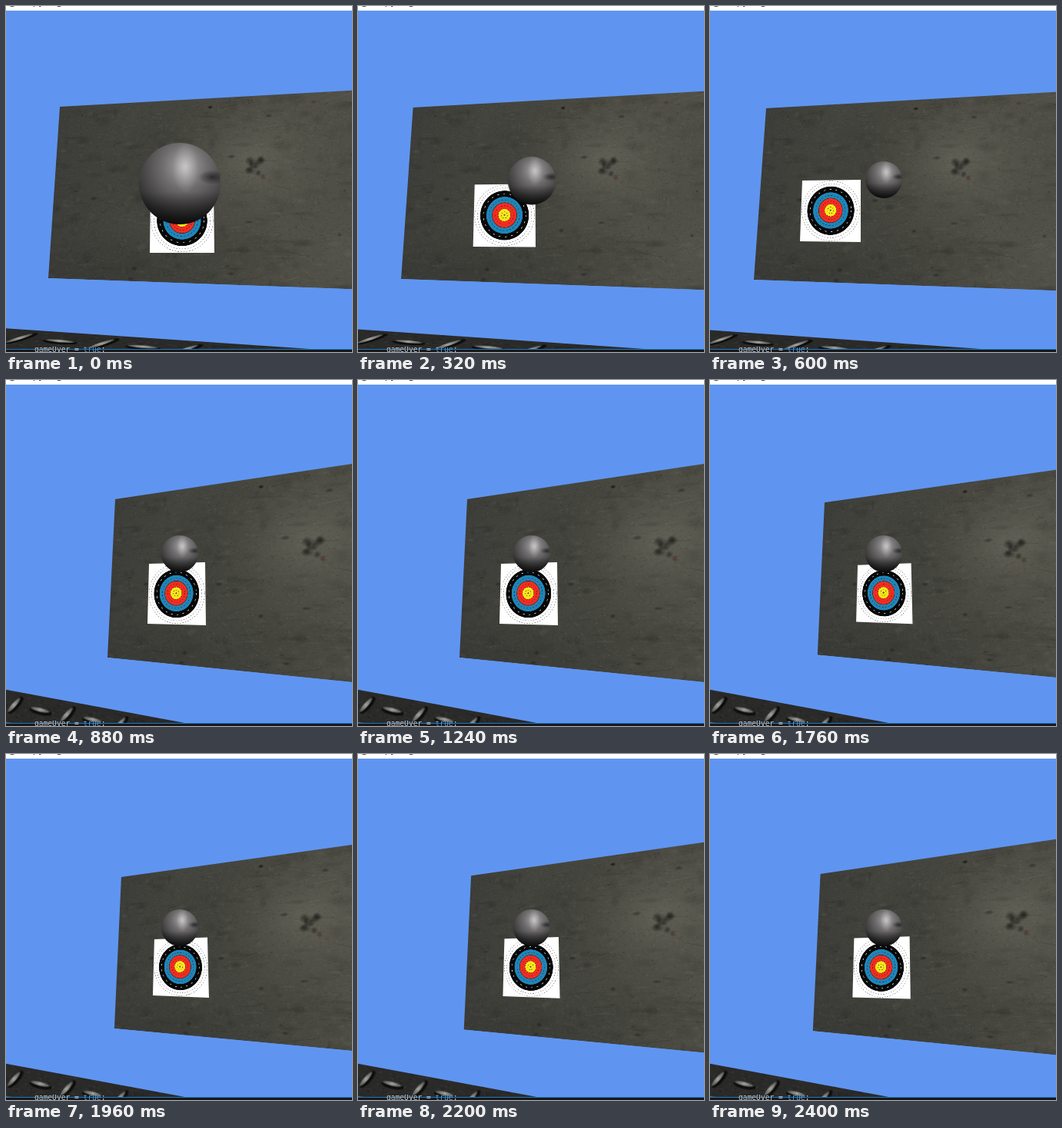
These frames come from a looping animation (450 by 450 pixels, 2.44 s). An HTML page with a canvas:

```html
<!DOCTYPE html>
<html lang="en">
<head>
<meta charset="utf-8">
<title>Ball and target</title>
<style>
  html, body { margin: 0; width: 100%; height: 100%; overflow: hidden; background: #5f95f0; }
  #stage { position: relative; width: 450px; height: 450px; overflow: hidden; background: #5f95f0; }
  #stage > * { position: absolute; left: 0; top: 0; }
  .plane { transform-origin: 0 0; }
  #ball {
    width: 106px; height: 106px; border-radius: 50%;
    background:
      radial-gradient(ellipse 18% 9% at 90% 42%, #0008 0, #0000 100%),
      radial-gradient(ellipse 16% 32% at 57% 30%, #fff5 0, #fff0 100%),
      linear-gradient(#0000 60%, #000a 100%),
      radial-gradient(circle at 56% 29%, #acaaaa 0, #8e8c8c 14%, #6f6d6d 30%, #575556 46%, #3f3e3f 62%, #161616 86%);
  }
  #title {
    width: 450px; height: 6px; overflow: hidden; background: #fff;
    font: 12px "Open Sans", sans-serif; color: #222;
  }
  #title span { position: absolute; top: -14px; line-height: 16px; }
  #editor {
    top: 446px !important; width: 450px; height: 4px; overflow: hidden;
    background: #17181c; border-top: 1px solid #2377b8; box-sizing: border-box;
  }
  #code {
    left: 37px !important; top: 443px !important; height: 7px; overflow: hidden; white-space: pre;
    font: 9.6px/8px "DejaVu Sans Mono", monospace; color: #c4c7ca;
  }
  #code b { font-weight: 400; color: #569cd6; }
</style>
</head>
<body>
<div id="stage">
  <canvas id="floor" class="plane" width="280" height="70"></canvas>
  <canvas id="wall" class="plane" width="600" height="300"></canvas>
  <svg id="target" class="plane" width="200" height="200" viewBox="-100 -100 200 200">
    <path fill="#fff" d="M-100-100H100V100H-100z"/>
    <g fill="none" stroke="#777" stroke-width="1.5" stroke-dasharray="4 5">
      <circle r="97"/><circle r="88"/>
    </g>
    <circle r="79" fill="#080808"/>
    <circle r="69" fill="none" stroke="#ccc" stroke-width="2" stroke-dasharray="6 14"/>
    <circle r="59" fill="#2085b8"/>
    <circle r="40" fill="#f52c20"/>
    <circle r="20" fill="#f8e71c"/>
    <g fill="none" stroke="#222" stroke-width="1.3">
      <circle r="49" stroke-dasharray="5 6"/><circle r="40"/>
      <circle r="30" stroke-dasharray="4 6"/><circle r="20" stroke-dasharray="4 4"/>
      <circle r="10" stroke-dasharray="4 5"/>
      <path d="M-3 0H3M0-3V3"/>
    </g>
  </svg>
  <div id="ball"></div>
  <div id="title">
    <span style="left:5px">g</span><span style="left:35px">p</span>
    <span style="left:43px">y</span><span style="left:66px">g</span>
  </div>
  <div id="editor"></div>
  <div id="code">gameOver = <b>true</b>;</div>
</div>
<script>
const LOOP = 2440, STEP = 40;
const TURN_START = 640, TURN_END = 880, SWAY_START = 1240, SWAY_HALF = 680;
const $ = id => document.getElementById(id);
const floor = $('floor'), wall = $('wall'), target = $('target'), ball = $('ball');

// Corners run clockwise from the top left: x, y pairs.
const poses = {
  start: {
    wall: [70, 131, 517, 106, 526, 371, 55, 354],
    target: [188, 238, 270, 238, 271, 321, 187, 321],
    floor: [-20, 418, 440, 449, 400, 495, -80, 460]
  },
  left: {
    wall: [73, 133, 518, 108, 527, 373, 57, 356],
    target: [120, 227, 196, 226, 196, 307, 117, 306],
    floor: [-20, 420, 410, 450, 370, 497, -75, 462]
  },
  near: {
    wall: [142, 155, 668, 76.5, 685, 416.6, 132, 361],
    target: [186, 239, 259, 237, 260, 319, 184, 317],
    floor: [-20, 399, 270, 453, 255, 520, -35, 466]
  },
  far: {
    wall: [150, 160, 643, 91, 660, 405.7, 141, 357],
    target: [193, 241, 262, 238.5, 264, 317, 191, 314],
    floor: [-20, 399, 270, 453, 255, 520, -35, 466]
  }
};

function random(seed) {
  return () => (seed = (seed * 16807) % 2147483647) / 2147483647;
}

function blot(c, x, y, rx, ry, color) {
  c.save();
  c.translate(x, y);
  c.scale(rx, ry);
  const g = c.createRadialGradient(0, 0, 0, 0, 0, 1);
  g.addColorStop(0, color);
  g.addColorStop(1, 'transparent');
  c.fillStyle = g;
  c.fillRect(-1, -1, 2, 2);
  c.restore();
}

function paintWall() {
  const c = wall.getContext('2d'), { width: w, height: h } = wall, r = random(71);
  const shade = c.createLinearGradient(0, 0, w, 0);
  shade.addColorStop(0, '#3d3d39');
  shade.addColorStop(.3, '#464640');
  shade.addColorStop(.7, '#56564d');
  shade.addColorStop(1, '#54544b');
  c.fillStyle = shade;
  c.fillRect(0, 0, w, h);
  blot(c, w * .6, h * .35, w * .4, h * .6, 'rgba(118,118,104,.42)');
  blot(c, w * .4, h, w * .6, h * .3, 'rgba(25,25,25,.22)');
  for (let i = 0; i < 480; i++) {
    const tone = r() < .5 ? '15,15,14' : '135,135,120';
    blot(c, r() * w, r() * h, 4 + r() * 26, 2 + r() * 11, `rgba(${tone},${.04 + r() * .12})`);
  }
  for (let i = 0; i < 7000; i++) {
    c.fillStyle = r() < .5 ? 'rgba(0,0,0,.15)' : 'rgba(170,170,152,.12)';
    c.fillRect(r() * w, r() * h, 1 + r() * 2, 1);
  }
  c.lineWidth = .7;
  for (let i = 0; i < 45; i++) {
    const x = r() * w, y = r() * h;
    c.strokeStyle = r() < .5 ? 'rgba(0,0,0,.2)' : 'rgba(160,160,145,.15)';
    c.beginPath();
    c.moveTo(x, y);
    c.lineTo(x + 15 + r() * 45, y + (r() - .6) * 35);
    c.stroke();
  }
  for (let i = 0; i < 22; i++) {
    blot(c, r() * w, r() * h, 2 + r() * 6, 1 + r() * 3, 'rgba(12,12,10,.4)');
  }
  for (let i = 0; i < 9; i++) {
    blot(c, w * .61 + (r() - .5) * 24, h * .385 + (r() - .5) * 24, 4 + r() * 7, 3 + r() * 6, 'rgba(16,15,13,.5)');
  }
  blot(c, w * .633, h * .44, 4, 5, 'rgba(125,52,38,.7)');
  blot(c, w * .48, h * .05, 5, 3, 'rgba(8,8,8,.85)');
  blot(c, w * .77, h * .05, 5, 3, 'rgba(115,50,38,.6)');
}

function paintFloor() {
  const c = floor.getContext('2d'), r = random(9);
  c.fillStyle = '#2a2a29';
  c.fillRect(0, 0, 280, 70);
  for (let i = 0; i < 900; i++) {
    c.fillStyle = r() < .5 ? '#0003' : '#8882';
    c.fillRect(r() * 280, r() * 70, 3, 1);
  }
  for (let row = 0; row < 3; row++) {
    for (let col = 0; col < 9; col++) {
      c.save();
      c.translate(33 + col * 33, 18 + row * 27);
      c.rotate((row + col) % 2 ? .05 : -1.1);
      c.fillStyle = '#0d0d0d';
      c.beginPath();
      c.ellipse(1, 2, 14, 4.5, 0, 0, 7);
      c.fill();
      const g = c.createLinearGradient(-13, 0, 13, 0);
      g.addColorStop(0, '#4b4b48');
      g.addColorStop(.5, '#a0a09a');
      g.addColorStop(1, '#4b4b48');
      c.fillStyle = g;
      c.beginPath();
      c.ellipse(0, 0, 12, 2.5, 0, 0, 7);
      c.fill();
      c.restore();
    }
  }
}

const mix = (a, b, k) => a + (b - a) * k;
const mixQuad = (a, b, k) => a.map((v, i) => mix(v, b[i], k));
const clamp = v => Math.min(1, Math.max(0, v));

// Projective map from a w by h rectangle to four corners.
function project(el, w, h, [x0, y0, x1, y1, x2, y2, x3, y3]) {
  const dx1 = x1 - x2, dx2 = x3 - x2, sx = x0 - x1 + x2 - x3;
  const dy1 = y1 - y2, dy2 = y3 - y2, sy = y0 - y1 + y2 - y3;
  const det = dx1 * dy2 - dx2 * dy1;
  const g = (sx * dy2 - dx2 * sy) / det, k = (dx1 * sy - sx * dy1) / det;
  const m = [
    (x1 - x0 + g * x1) / w, (y1 - y0 + g * y1) / w, 0, g / w,
    (x3 - x0 + k * x3) / h, (y3 - y0 + k * y3) / h, 0, k / h,
    0, 0, 1, 0, x0, y0, 0, 1
  ];
  el.style.transform = `matrix3d(${m.map(v => v.toFixed(9))})`;
}

function poseAt(t) {
  if (t < 600) return [poses.start, poses.left, t / 600];
  if (t < TURN_END) return [poses.left, poses.near, clamp((t - TURN_START) / (TURN_END - TURN_START))];
  const swing = Math.max(0, t - SWAY_START) / SWAY_HALF;
  return [poses.near, poses.far, (1 - Math.cos(Math.PI * swing)) / 2];
}

function draw(t) {
  const [a, b, k] = poseAt(t);
  project(floor, 280, 70, mixQuad(a.floor, b.floor, k));
  project(wall, 600, 300, mixQuad(a.wall, b.wall, k));
  project(target, 200, 200, mixQuad(a.target, b.target, k));
  // The ball's distance grows evenly, so its size falls as 1 / distance.
  const away = clamp(t / 560), size = 1 / mix(1, 53 / 24, away);
  const y = 226 + 5 * (size - 24 / 53) / (1 - 24 / 53);
  ball.style.transform = `translate(173px, ${y - 53}px) scale(${size})`;
}

paintWall();
paintFloor();
draw(0);
const began = performance.now();
function tick() {
  const t = (performance.now() - began) % LOOP;
  draw(Math.floor(t / STEP) * STEP);
  requestAnimationFrame(tick);
}
requestAnimationFrame(tick);
</script>
</body>
</html>
```
